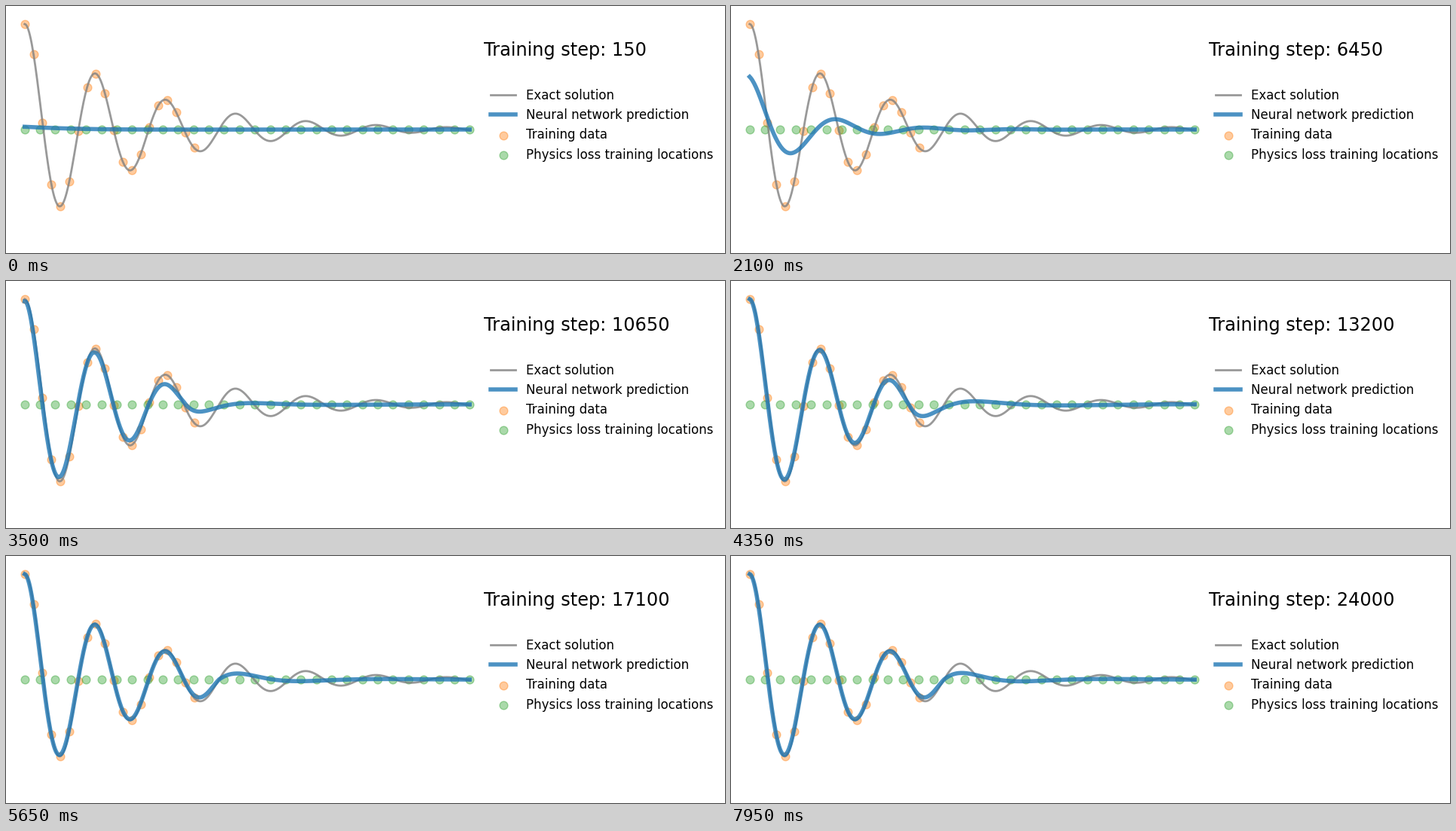
Animation, 954 px wide and 328 px high, one loop 8 s. Source, as a matplotlib script:

```python
import numpy as np
import matplotlib.pyplot as plt
from matplotlib.animation import FuncAnimation

W, H, DPI = 954, 328, 100
FRAMES, INTERVAL, STEP = 160, 50, 150

DAMP, W0 = 4, 40
FREQ = np.sqrt(W0**2 - DAMP**2)
PHI = np.arctan(-DAMP / FREQ)

plt.rcParams["font.family"] = "DejaVu Sans"


def oscillator(x):
    """Underdamped harmonic oscillator starting at rest from 1."""
    return np.exp(-DAMP * x) * np.cos(FREQ * x + PHI) / np.cos(PHI)


def ripple(amp, decay, half):
    """Early fit: a damped wave with the given half period."""
    return amp * np.exp(-t / decay) * np.cos(np.pi * t / half)


def fit(k, scale, lead, dip, peak, half, growth):
    """Follow the oscillator up to its k-th zero, then die out in a wave
    whose half periods start at `half` and lengthen by `growth`."""
    zero = ((k + 0.5) * np.pi - PHI) / FREQ
    early = t / 0.06 * np.exp(1 - t / 0.06)
    envelope = (scale + (1 - scale) * np.exp(-t / 0.03)) \
        * (1 - 0.35 * np.exp(np.minimum(t - zero, 0) / 0.055))
    head = oscillator(t + lead * early) * envelope - dip * np.exp(-t / 0.006)

    past = np.maximum(t - zero, 0)
    phase = np.pi * np.log1p(past * (growth - 1) / half) / np.log(growth)
    sign = 1 if k % 2 else -1
    tail = sign * peak / 0.573 * np.sin(phase) * np.exp(-0.405 * phase)
    return np.where(t < zero, head, tail)


t = np.linspace(0, 1, 500)
exact = oscillator(t)

# training step -> shape of the prediction
STATES = [
    (150, ripple(0.026, 0.12, 0.5)),
    (4200, ripple(0.05, 0.14, 0.24)),
    (5250, ripple(0.13, 0.12, 0.17)),
    (6450, ripple(0.5, 0.12, 0.1)),
    (7800, fit(2, 0.81, 0.005, 0.2, 0.1, 0.13, 1.4)),
    (8400, fit(3, 0.88, 0.005, 0.07, 0.107, 0.14, 1.42)),
    (13200, fit(4, 0.975, 0.001, 0, 0.11, 0.097, 1.65)),
    (17100, fit(5, 0.98, 0.001, 0, 0.057, 0.122, 1.4)),
    (24000, fit(5, 0.98, 0.001, 0, 0.062, 0.118, 1.4)),
]


def prediction(step):
    for (s0, u0), (s1, u1) in zip(STATES, STATES[1:]):
        if step <= s1:
            k = (step - s0) / (s1 - s0)
            if s0 >= 8400:                      # convergence slows down
                k = np.expm1(-2 * k) / np.expm1(-2)
            return u0 + (u1 - u0) * k
    return STATES[-1][1]


fig = plt.figure(figsize=((W + 1e-6) / DPI, (H + 1e-6) / DPI), dpi=DPI,
                 facecolor="white")
ax = fig.add_axes([10 / W, 10 / H, 620 / W, 308 / H])
ax.set_xlim(-0.025, 1.025)
ax.set_ylim(-1.1, 1.1)
ax.axis("off")

ax.plot(t, exact, color="grey", lw=2, alpha=0.8, label="Exact solution")
curve, = ax.plot(t, exact, color="tab:blue", lw=4, alpha=0.8,
                 label="Neural network prediction")
ax.scatter(t[:200:10], exact[:200:10], s=60, color="tab:orange", alpha=0.4,
           label="Training data")
ax.scatter(np.linspace(0, 1, 30), np.zeros(30), s=60, color="tab:green",
           alpha=0.4, label="Physics loss training locations")
ax.legend(loc=(1.01, 0.34), frameon=False, fontsize="large")
title = ax.text(1.032, 0.7, "", fontsize="xx-large", color="black")


def update(i):
    step = STEP * (i + 1)
    curve.set_ydata(prediction(step))
    title.set_text(f"Training step: {step}")
    return curve, title


anim = FuncAnimation(fig, update, frames=FRAMES, interval=INTERVAL,
                     repeat=True, repeat_delay=0, blit=False)
plt.show()
```
